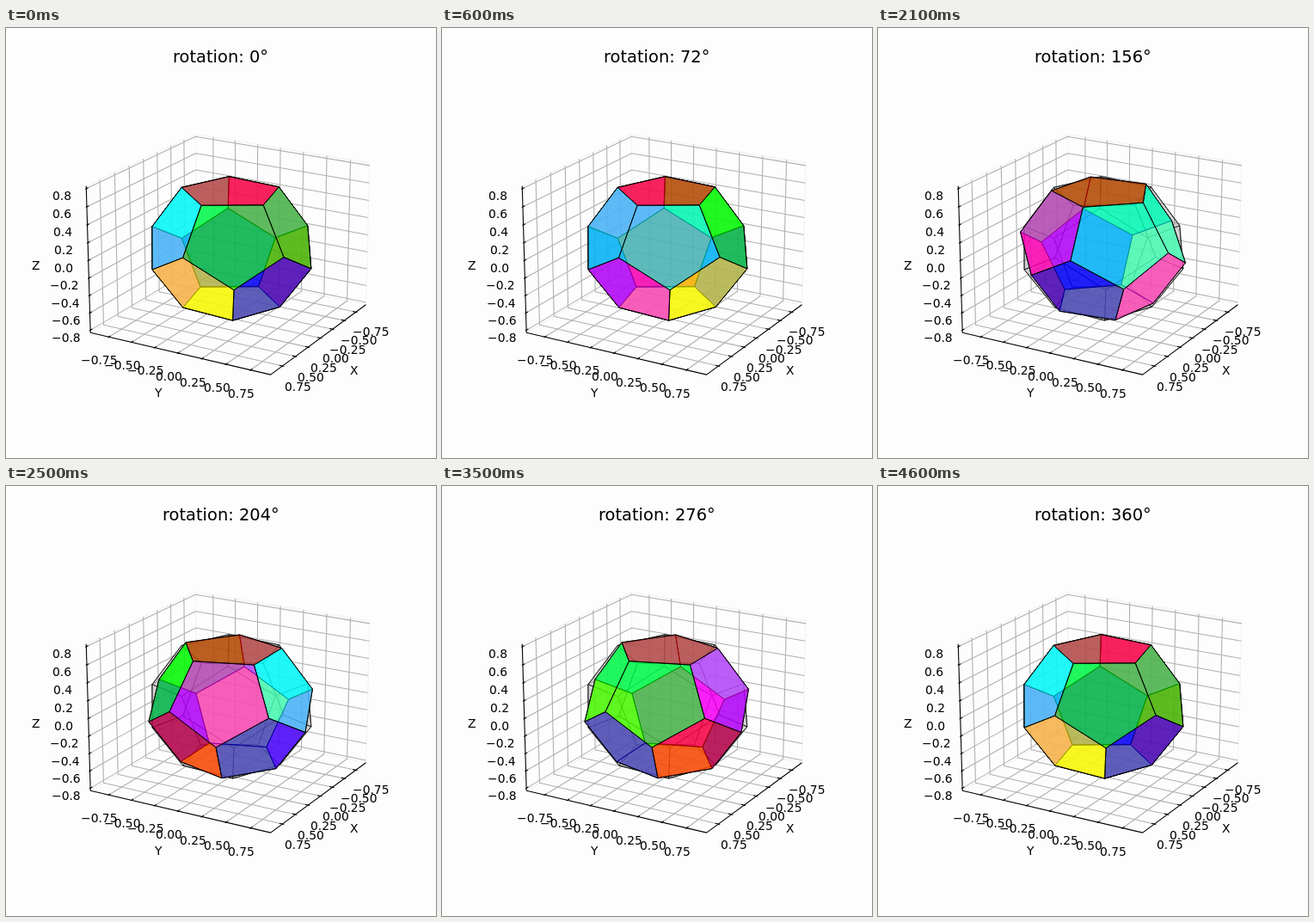
Write an HTML page with a canvas that moves like this. It is 500 px wide and 500 px high and loops after 5100 ms.

```html
<!DOCTYPE html>
<html lang="en">
<head>
<meta charset="utf-8">
<title>Dodecahedron rotation</title>
<style>
html, body { margin: 0; height: 100%; overflow: hidden; background: #fdfdfd; }
canvas { display: block; }
</style>
</head>
<body>
<canvas id="stage" width="500" height="500"></canvas>
<script>
const ctx = document.getElementById('stage').getContext('2d');
const rad = Math.PI / 180;
const sinA = Math.sin(30 * rad), cosA = Math.cos(30 * rad);
const sinE = Math.sin(20 * rad), cosE = Math.cos(20 * rad);

// Half sizes of the plot box, and the data limits they stand for
const half = [0.5714, 0.5714, 0.4286];
const limit = [0.973, 0.952, 0.829];
const toBox = p => p.map((v, i) => v / limit[i] * half[i]);

const depth = ([x, y, z]) => (x * cosA + y * sinA) * cosE + z * sinE;
function project(p) {
  const [x, y, z] = p;
  const k = 208.1 / (1 - depth(p) / 10);
  return [
    261.45 + k * (y * cosA - x * sinA),
    255.1 + k * ((x * cosA + y * sinA) * sinE - z * cosE)
  ];
}

function trace(points, closed) {
  ctx.beginPath();
  points.forEach(p => ctx.lineTo(...project(p)));
  if (closed) ctx.closePath();
}
function line(color, ...points) {
  ctx.strokeStyle = color;
  trace(points);
  ctx.stroke();
}
// Text centred on x, set on whole pixels
function text(str, x, y, size = 13.89) {
  ctx.font = size + 'px "DejaVu Sans", sans-serif';
  ctx.fillStyle = '#000';
  ctx.fillText(str, Math.round(x - ctx.measureText(str).width / 2), Math.round(y));
}

// Ticks of one axis: label text and place along the axis
function ticks(axis, step, count, digits) {
  return Array.from({ length: 2 * count + 1 }, (_, i) => {
    const v = (i - count) * step;
    return {
      at: v / limit[axis] * half[axis],
      label: (v < 0 ? '\u2212' : '') + Math.abs(v).toFixed(digits)
    };
  });
}
const xTicks = ticks(0, 0.25, 3, 2);
const yTicks = ticks(1, 0.25, 3, 2);
const zTicks = ticks(2, 0.2, 4, 1);

function drawAxes() {
  const [X, Y, Z] = half;
  const pad = 0.0952, padZ = 0.0714;
  const grid = '#b0b0b0', pane = '#f2f2f2';
  ctx.lineWidth = 1.1;

  line(pane, [X, -Y, Z], [-X, -Y, Z], [-X, Y, Z], [-X, Y, -Z], [-X, -Y, -Z], [X, -Y, -Z]);
  line(pane, [-X, -Y, Z], [-X, -Y, -Z]);
  for (const { at } of xTicks) line(grid, [at, Y, -Z], [at, -Y, -Z], [at, -Y, Z]);
  for (const { at } of yTicks) line(grid, [X, at, -Z], [-X, at, -Z], [-X, at, Z]);
  for (const { at } of zTicks) line(grid, [X, -Y, at], [-X, -Y, at], [-X, Y, at]);

  line('#000', [X, -Y, Z], [X, -Y, -Z], [X, Y, -Z], [-X, Y, -Z]);
  const mark = (label, from, to, spot) => {
    line('#000', from, to);
    const [x, y] = project(spot);
    text(label, x, y + 10.7);
  };
  const near = 0.019, far = 0.0095;
  for (const { at, label } of xTicks)
    mark(label, [at, Y - near, -Z], [at, Y + far, -Z], [at, Y + pad, -Z - padZ]);
  for (const { at, label } of yTicks)
    mark(label, [X - near, at, -Z], [X + far, at, -Z], [X + pad, at, -Z - padZ]);
  for (const { at, label } of zTicks)
    mark(label, [X - near, -Y, at], [X + far, -Y, at], [X + pad, -Y - pad, at]);

  text('X', 405, 403);
  text('Y', 177, 429);
  text('Z', 34.5, 281);
}

const red = '255,0,0', green = '0,255,0', blue = '0,0,255';
const cyan = '0,255,255', magenta = '255,0,255', yellow = '255,255,0';
const upperColors = [green, green, magenta, cyan, cyan];
const lowerColors = [blue, red, blue, magenta, yellow];

function faces(turn) {
  const vertex = (i, shift, r, z) => {
    const a = (31.5 + shift + 72 * i + turn) * rad;
    return toBox([r * Math.cos(a), r * Math.sin(a), z]);
  };
  const cap = i => vertex(i, 36, 0.478, 0.629);
  const high = i => vertex(i, 36, 0.774, 0.1485);
  const low = i => vertex(i, 0, 0.774, -0.1485);
  const base = i => vertex(i, 0, 0.478, -0.629);
  const five = [0, 1, 2, 3, 4];
  const list = [
    { color: red, points: five.map(cap) },
    { color: yellow, points: five.map(base) }
  ];
  for (const i of five) {
    list.push({ color: upperColors[i], points: [cap(i - 1), cap(i), high(i), low(i), high(i - 1)] });
    list.push({ color: lowerColors[i], points: [base(i), base(i + 1), low(i + 1), high(i), low(i)] });
  }
  const total = f => f.points.reduce((sum, p) => sum + depth(p), 0);
  return list.sort((a, b) => total(a) - total(b));
}

function drawSolid(turn, alpha, width, tint) {
  ctx.lineWidth = width;
  ctx.strokeStyle = '#000';
  for (const { color, points } of faces(turn)) {
    trace(points, true);
    ctx.fillStyle = `rgba(${tint || color},${alpha})`;
    ctx.fill();
    ctx.stroke();
  }
}

// Each second: six jumps of 12 degrees, then a rest
function angleAt(ms) {
  const t = ms % 5100;
  return 12 * (6 * Math.floor(t / 1000) + Math.min(6, Math.floor(t % 1000 / 100)));
}

ctx.lineJoin = 'round';
const start = performance.now();

function frame() {
  const angle = angleAt(performance.now() - start);
  ctx.fillStyle = '#fdfdfd';
  ctx.fillRect(0, 0, 500, 500);
  drawAxes();
  drawSolid(0, 0.2, 0.7, '128,128,128');
  drawSolid(angle, 0.6, 1);
  text(`rotation: ${angle}°`, 250, 40, 19.44);
  requestAnimationFrame(frame);
}
frame();
</script>
</body>
</html>
```
